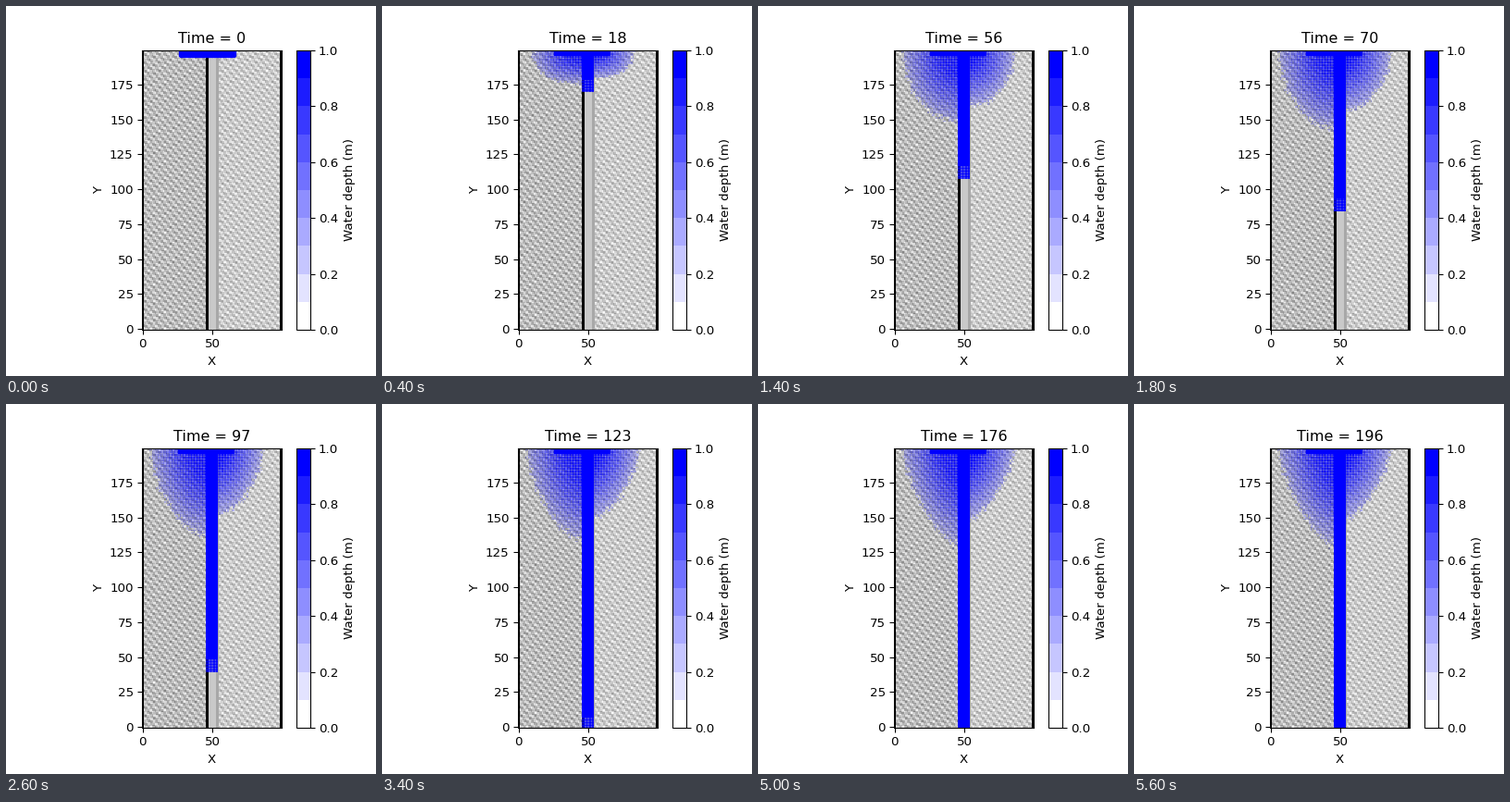
A matplotlib script for the animation above (5800 ms loop, 400 by 400 pixels).

```python
import numpy as np
import matplotlib.pyplot as plt
from matplotlib.animation import FuncAnimation
from matplotlib.cm import ScalarMappable
from matplotlib.colors import LinearSegmentedColormap, Normalize

SIZE, DPI = 400, 96
ROWS, COLS, FRAMES = 200, 100, 29
BLUE = np.array([0, 0, 1.0])

r, c = np.mgrid[0:ROWS, 0:COLS]
rough = np.random.default_rng(4).random((ROWS, COLS))
left = c < 50
channel = (c >= 46) & (c <= 53)
inflow = (c >= 26) & (c <= 65) & (r >= 196)
# distance from the channel bank and from the upper edge
bank = np.maximum(np.where(left, 46 - c, c - 53), 0)
down = ROWS - 1 - r
lattice = 1.1 - 0.22 * (r % 2 == 0) - 0.22 * (c % 2 == 0)


def settle(t, tau):
    return 1 - np.exp(-t / tau)


def terrain():
    wave = (np.sin(1.26 * c + 1.1 * r) + 0.5 * np.sin(2.5 * c - 1.57 * r)
            + 0.7 * np.sin(0.45 * c + 2.1 * r))
    g = np.where(left, 0.74 + 0.11 * wave, 0.8 + 0.095 * wave)
    g[:, 46:48] = 0
    g[:, 48:53] = 0.79
    g[:, 53:55] = 0.66
    g[:, [0, -1]] = 0
    return np.repeat(np.clip(g, 0, 1)[..., None], 3, axis=2)


def water(t):
    """Opacity of the water over each cell."""
    reach = np.where(left, 70 * settle(t, 45), 51 * settle(t, 38))
    width = np.where(left, 40, 33) * (0.5 + 0.5 * settle(t, 12))
    bend = 2.75 - 1.4 * settle(t, 70)
    s = ((bank / width) ** bend + (down / reach) ** bend) ** (1 / bend)
    s += 0.12 * (rough - 0.5)
    strength = np.where(left, 0.95, 0.8)
    a = np.clip(strength * (1 - s) + 0.2, 0, 0.85) * lattice * (s < 1)
    tip = ROWS - 1 - 1.64 * t
    stream = np.where(r > tip + 9, 1, lattice)
    a = np.where(channel & (r >= tip), stream, a)
    return np.clip(np.where(inflow, 1, a), 0, 1)


def panel(x, w):
    return fig.add_axes([x / SIZE, 0.125, w / SIZE, 0.755])


fig = plt.figure(figsize=(SIZE / DPI, SIZE / DPI), dpi=DPI)
ax = panel(147, 151)
ground = terrain()
img = ax.imshow(ground, origin="lower", interpolation="nearest", aspect="auto")
ax.set(xlabel="X", ylabel="Y", xticks=[0, 50], yticks=range(0, ROWS, 25))
title = ax.set_title("Time = 0")
start = inflow & (c > 26)
seed, = ax.plot(c[start], r[start], "o", color="blue", ms=3)

cmap = LinearSegmentedColormap.from_list("depth", ["white", "blue"], N=10)
fig.colorbar(ScalarMappable(Normalize(0, 1), cmap), cax=panel(313.5, 15.1),
             label="Water depth (m)")


def draw(i):
    t = round(6.6 * i + 11.2 * settle(i, 3.8))
    a = water(t)[..., None] if t else 0
    img.set_data(ground * (1 - a) + BLUE * a)
    seed.set_visible(t == 0)
    title.set_text(f"Time = {t}")
    return img, seed, title


anim = FuncAnimation(fig, draw, frames=FRAMES, interval=200, repeat=True,
                     repeat_delay=0, blit=False)
plt.show()
```
